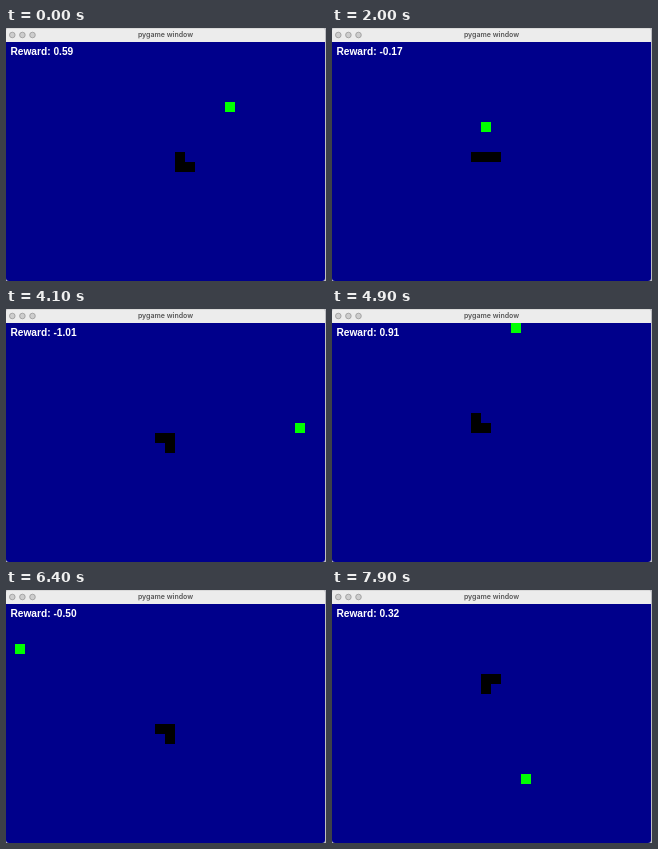
Recreate the animation shown at these times as an HTML page. Size 320 by 253 pixels, loop 8000 ms.

```html
<!DOCTYPE html>
<html lang="en">
<head>
<meta charset="utf-8">
<title>pygame window</title>
<style>
  html, body { margin: 0; width: 100%; height: 100%; overflow: hidden; background: #bdbdc2; }
  svg { display: block; width: 320px; height: 253px; }
  .title { font: 600 7px Inter, "Liberation Sans", sans-serif; fill: #555; text-anchor: middle; }
  .reward { font: bold 10.2px "Liberation Sans", Arial, sans-serif; fill: #fff; }
  .cell { shape-rendering: crispEdges; }
</style>
</head>
<body>
<svg viewBox="0 0 320 253">
  <clipPath id="frame"><rect width="319" height="253" rx="3"/></clipPath>
  <g clip-path="url(#frame)">
    <rect width="320" height="14" fill="#ececec"/>
    <rect width="320" height="0.6" fill="#cfcfcf"/>
    <g fill="#cdcdcd" stroke="#909090" stroke-width="0.7">
      <circle cx="6.3" cy="7" r="2.8"/>
      <circle cx="16.4" cy="7" r="2.8"/>
      <circle cx="26.5" cy="7" r="2.8"/>
    </g>
    <text class="title" x="159.5" y="9.4">pygame window</text>
    <rect y="14" width="320" height="239" fill="#00008b"/>
    <g class="cell" id="snake"><rect/><rect/><rect/></g>
    <rect class="cell" id="food" fill="#0f0"/>
    <text class="reward" id="reward" x="4.4" y="27"></text>
  </g>
</svg>
<script>
  const STEP = 100, LOOP = 8000;
  const START = [[15, 11], [14, 11], [13, 11]];
  const DIRS = { U: [0, -1], D: [0, 1], L: [-1, 0], R: [1, 0] };

  // Each episode: food column, food row, moves from the start pose.
  const EPISODES = [
    [22, 6, "RRDRDD"], [3, 19, "URURU"], [30, 22, "RD"], [12, 1, "DDRD"],
    [26, 15, "RUU"], [6, 12, "DLD"], [15, 8, "RDRU"], [24, 18, "UULUR"],
    [9, 6, "UULD"], [20, 20, "RR"], [2, 14, "DRD"], [29, 10, "DRULU"],
    [7, 22, "RRUU"], [18, 0, "ULU"], [31, 16, "DDLD"], [0, 21, "DRURR"],
    [11, 3, "URD"], [1, 4, "DRDR"], [27, 5, "RUUR"], [13, 20, "DDRDD"],
    [19, 17, "UUUUR"]
  ];

  const distance = (a, b) => Math.hypot(a[0] - b[0], a[1] - b[1]);

  function play([fx, fy, moves]) {
    const food = [fx, fy];
    let snake = START;
    return [...moves].map(move => {
      const [dx, dy] = DIRS[move], [x, y] = snake[0];
      const head = [x + dx, y + dy];
      // Reward is the distance gained, less a small cost per step.
      const reward = distance(snake[0], food) - distance(head, food) - 0.01;
      snake = [head, snake[0], snake[1]];
      return { food, snake, reward };
    });
  }

  // The loop opens on the fourth move of the first episode.
  const states = EPISODES.flatMap(play).slice(3);

  const foodBox = document.getElementById("food");
  const cells = [...document.getElementById("snake").children];
  const label = document.getElementById("reward");

  function place(box, [col, row]) {
    box.setAttribute("x", Math.max(0, col * 10 - 1));
    box.setAttribute("y", 14 + row * 10);
    box.setAttribute("width", 10);
    box.setAttribute("height", 10);
  }

  let shown = -1;
  function draw(now) {
    const step = Math.floor((now % LOOP) / STEP);
    if (step !== shown) {
      shown = step;
      const { food, snake, reward } = states[step];
      place(foodBox, food);
      cells.forEach((cell, i) => place(cell, snake[i]));
      label.textContent = "Reward: " + reward.toFixed(2);
    }
  }

  const begin = performance.now();
  function tick() {
    draw(performance.now() - begin);
    requestAnimationFrame(tick);
  }
  tick();
</script>
</body>
</html>
```
